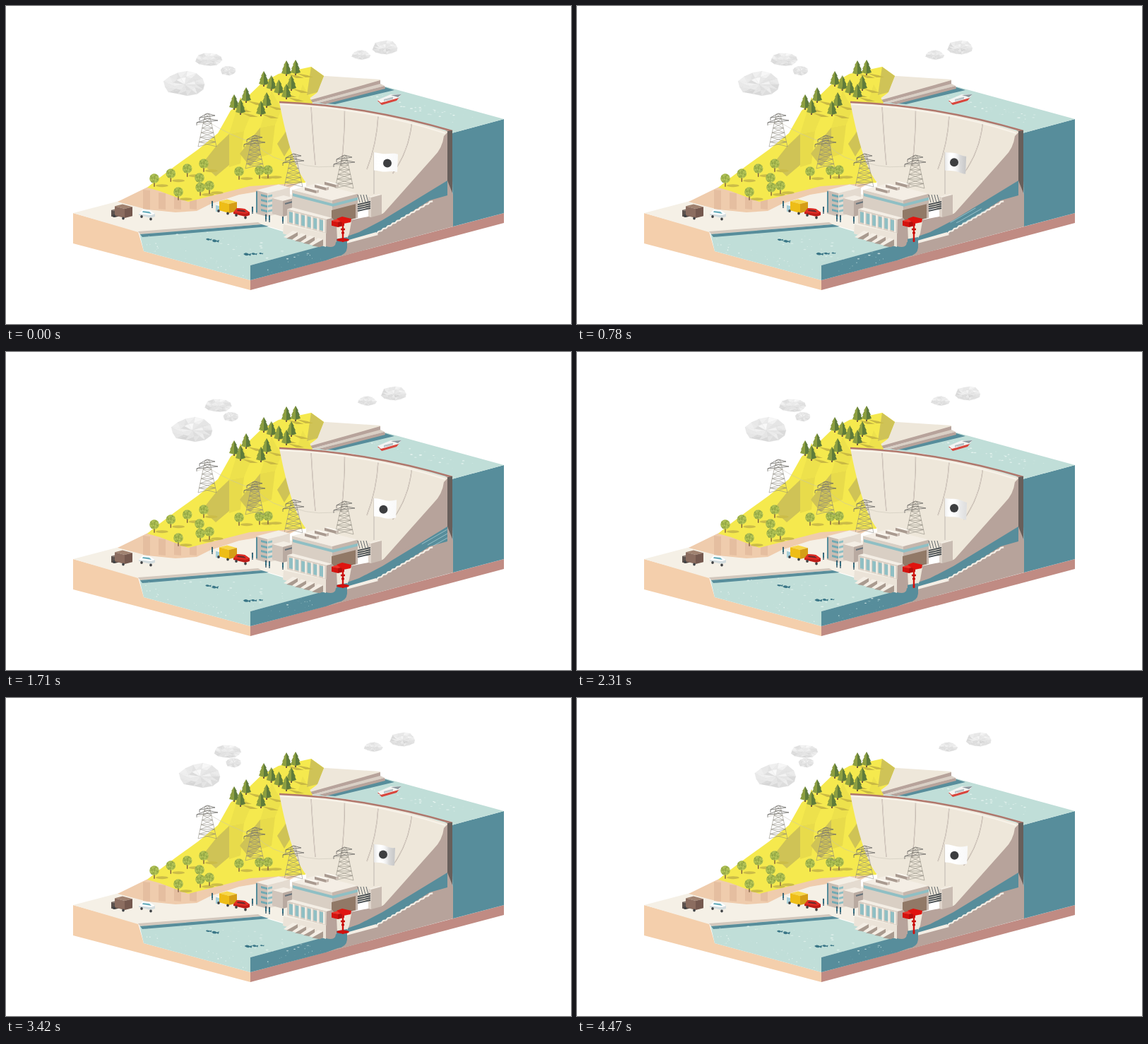
An HTML page for the animation above (4500 ms loop, 800 by 450 pixels).

```html
<!DOCTYPE html>
<html lang="en">
<head>
<meta charset="utf-8">
<title>Hydroelectric dam</title>
<style>
html, body { margin: 0; width: 100%; height: 100%; overflow: hidden; background: #fff; }
svg { display: block; width: 100vw; height: 100vh; }
</style>
</head>
<body>
<svg id="stage" viewBox="0 0 800 450">
  <defs>
    <linearGradient id="fold">
      <stop offset="0" stop-color="#777" stop-opacity=".3"/>
      <stop offset=".3" stop-color="#fff" stop-opacity="0"/>
      <stop offset=".7" stop-color="#777" stop-opacity=".4"/>
      <stop offset="1" stop-color="#888" stop-opacity=".7"/>
    </linearGradient>
  </defs>
</svg>
<script>
const NS = 'http://www.w3.org/2000/svg';
const LOOP = 4500, STEP = 30, TAU = Math.PI * 2;
const ISO = .26; // slope of the two ground axes
const stage = document.getElementById('stage');
const cream = '#eee7da', light = '#f4eee5', mauve = '#b7a39b', teal = '#578d9b', pale = '#c0ded8', glass = '#8fbfc4';

let seed = 11;
const rnd = () => (seed = (seed * 16807) % 2147483647) / 2147483647;
const times = (n, fn) => Array.from({ length: n }, (_, i) => fn(i));

function add(tag, attrs, parent = stage) {
  const el = document.createElementNS(NS, tag);
  for (const k in attrs) el.setAttribute(k, attrs[k]);
  parent.appendChild(el);
  return el;
}
const poly = (fill, points, parent) => add('polygon', { fill, points }, parent);
const path = (fill, d, parent) => add('path', { fill, d }, parent);
const line = (stroke, w, d, parent) =>
  add('path', { stroke, d, fill: 'none', 'stroke-width': w, 'stroke-linejoin': 'round' }, parent);
const oval = (fill, cx, cy, rx, ry, parent) => add('ellipse', { fill, cx, cy, rx, ry }, parent);

// upright parallelogram whose top edge starts at x, y
const panel = (fill, x, y, w, h, slope = ISO) =>
  path(fill, `M${x} ${y}l${w} ${w * slope}v${h}l${-w} ${-w * slope}z`);

// block seen from above; x, y is its front top corner
function box(x, y, l, r, h, [top, left, right]) {
  path(top, `M${x} ${y}l${-l} ${-l * ISO}l${r} ${-r * ISO}l${l} ${l * ISO}z`);
  panel(left, x - l, y - l * ISO, l, h);
  panel(right, x, y, r, h, -ISO);
}

function drawGround() {
  poly('#f4cfac', '95,293 187,319 195,347 346,388 346,402 95,336');
  poly('#c08b83', '346,388 705,293 705,307 346,402');
  poly('#f5f0e6', '95,293 160,276 352,250 460,285 460,338 362,309 187,320');
  poly(pale, '189,322 362,310 455,338 346,367 346,388 195,347');
  poly('#d3c8bd', '187,319 357,306 362,309 190,323');
  poly(teal, '190,323 362,309 372,312 193,327');
  poly(teal, '346,367 453,338 453,360 346,388');
}

function drawReservoir() {
  poly(teal, '631,180 705,160 705,293 633,312');
  poly(pale, '430,137 537,114 705,160 631,180 560,160 490,144');
  poly(teal, '442,137 537,115 550,119 466,139');
  poly(cream, '437,98 530,104 530,109 424,136');
  poly(mauve, '530,105 530,111 432,137 420,136');
  poly('#d9cfc5', '530,110 536,113 445,137 432,137');
  poly(mauve, '536,113 537,117 452,139 444,137');
  // ship
  poly('#d8453c', '526,134 557,129 553,134 532,140');
  poly('#f4f4f2', '526,133 545,125 560,125 556,130 531,137');
  poly('#8b969d', '545,126 560,125 555,129');
  panel('#b9c2c6', 535, 132, 13, 3, -ISO);
}

function drawHill() {
  poly('#efccad', '158,277 203,255 258,274 345,252 420,248 400,258 354,263 330,267 290,280 270,290 240,292 200,288');
  times(4, i => panel('#e5bea0', 194 + i * 22, 260 + i * 4, 10, 27 - i * 4, .1));
  path('#f5e94e', 'M200 257L212 247L240 226L272 203L300 180L318 148L336 134L362 109L386 96L432 86L450 99L440 123L424 135V250L345 255L258 277L218 262Z');
  // three large creases, each with a shaded and a lit side
  times(3, i => {
    const x = 316 + i * 44, w = 38 - i * 9, top = 181 - i * 9, foot = 241 - i * 14;
    poly('#cfc356', `${x},${top} ${x},${foot - 16} ${x - w / 2},${foot} ${x - w},${foot - 18} ${x - w / 2},${top + 18}`);
    poly('#e8db4b', `${x},${top} ${x + 21},${top - 4} ${x + 16},${foot - 18} ${x},${foot - 13}`);
    poly('#ede14c', `${x},${top} ${x + 16},${top - 52} ${x + 30},${top - 26} ${x + 21},${top - 4}`);
  });
  poly('#cfc357', '432,86 450,99 441,122 426,126');
}

function pine(x, y) {
  const g = add('g', { transform: `translate(${x} ${y})` });
  poly('#c9b944', '1,18 17,21 25,24 14,24', g);
  line('#76573f', 2, 'M0 16v5', g);
  poly('#8c9e40', '0,-1 -4,6 -3,6 -6,12 -5,12 -7,17 0,19', g);
  poly('#5f7b3b', '0,-1 4,6 3,6 6,12 5,12 7,17 0,19', g);
}

function bush(x, y) {
  const r = 6.8;
  oval('#cbbc48', x + r * 1.6, y + r * 1.5, r * 1.3, 2);
  line('#7b5b3d', 1.4, `M${x} ${y + r - 1}v6`);
  oval('#a5b84d', x, y, r, r);
  times(16, i => {
    const a = i * 2.4, d = r * Math.sqrt(i / 17);
    oval(i % 2 ? '#c9d46c' : '#7f9340', x + Math.cos(a) * d, y + Math.sin(a) * d, .8, .7);
  });
}

// n plants from x, y; bend < 1 crowds them toward the far end
const row = (plant, n, x, y, dx, dy, bend = 1) =>
  times(n, i => {
    const u = (i / (n - 1)) ** bend;
    plant(x + dx * u, y + dy * u);
  });

function drawTrees() {
  row(pine, 2, 397, 78, 13, -1);
  row(pine, 2, 404, 99, -35, 24);
  row(pine, 4, 365, 93, 32, 18);
  row(pine, 2, 340, 116, -17, 10);
  row(pine, 2, 332, 133, 29, 2);
  row(bush, 4, 280, 223, -70, 21);
  row(bush, 3, 330, 234, 41, -2, .5);
  bush(274, 243);
  row(bush, 3, 244, 263, 44, -9, .5);
}

function drawDam() {
  path(mauve, 'M612 180L625 176V249L533 300V285Z');
  path(cream, 'M387 136Q510 141 626 178L620 184Q618 201 606 213L533 295L425 262V250Q404 225 387 136Z');
  times(4, i => {
    const x = 432 + i * 47.5, d = `M${x} ${141 + i * 5 + i * i}q${2 - i * 2} 40 ${6 - i * 11} ${84 - i * 4}`;
    line('#a99b91', 1.3, d);
    line('#faf5ec', .6, d);
  });
  line('#f8f3ea', 2, 'M388 139Q510 144 622 180');
  line('#b0766b', 2.6, 'M387 136Q510 141 632 177');
  panel('#685f5b', 625, 177, 7, 92, -.15);
}

function drawSection() {
  poly(mauve, '453,302 462,308 533,294 625,247 633,267 633,312 453,360');
  path(teal, 'M625 247V268L600 275L542 312L527 321L483 333V326L500 320L533 303Z');
  poly(light, '482,336 482,332 524,320 527,324');
  line(light, 2.2, 'M525 322' + 'l2.4 -3l4.2 -.8'.repeat(12));
  poly(cream, '468,308 489,305 486,322 482,331 469,332');
  path(teal, 'M466 330L483 327V342Q482 352 470 354L453 360V340Q470 344 466 330Z');
}

function drawPlant() {
  // office
  box(370, 265, 16, 32, 33, ['#f4efe6', '#cabdb3', '#e4dbd0']);
  times(4, i => {
    panel('#70a9b3', 361, 266 + i * 7, 9, 3);
    panel(glass, 371, 268 + i * 7, 6, 3, -ISO);
  });
  panel(teal, 354, 262, 2, 30);
  box(392, 276, 15, 16, 22, [light, '#d1c5bb', '#b9aaa1']);
  line('#66727a', 2, 'M395 280L406 277');

  // turbine hall
  box(462, 275, 57, 36, 34, [light, '#d9cfc4', '#c5b6ac']);
  panel(glass, 406, 265, 56, 4);
  panel(glass, 462, 280, 36, 4, -ISO);
  panel('#917967', 461, 289, 34, 20, -ISO);
  times(3, i => box(439 + i * 14, 261 - i * 4, 16, 4, 4, ['#fbf7f0', '#a99a90', '#c9bcb2']));

  // switchgear and side wall
  box(517, 271, 4, 15, 28, [light, '#ded4ca', '#c9bcb2']);
  times(4, i => {
    line('#474d50', 1.8, `M498 ${281 + i * 3}l18 -4`);
    line('#62696c', 1, `M${501 + i * 4} 278l-3 -11`);
  });

  // intake annex
  box(454, 302, 56, 8, 20, [light, '#d9cfc4', mauve]);
  times(6, i => {
    const x = 401 + i * 8.6, y = 291 + i * 2.2;
    panel(glass, x, y, 5, 15);
    panel(light, x + 5, y, 2.4, 18);
  });
  poly(mauve, '454,303 462,300 468,308 468,334 453,340');

  // spillways
  poly('#ebe3d8', '393,309 453,322 453,341 392,322');
  times(4, i => {
    const at = `M${393 + i * 12} ${327 + i * 3.4}`;
    path(light, at + 'l13 -9l8 2l-14 9z');
    path('#a99a8f', at + 'm4 2l16 -9v9l-5 2z');
  });
}

function drawPylon(x, y) {
  const h = 46, rungs = 7, half = k => 3 + 10 * k;
  const d = times(rungs, i => {
    const a = i / rungs, b = (i + 1) / rungs, p = half(a), q = half(b), s = h / rungs;
    return `M${x - p} ${y + a * h}h${2 * p}l${q - p} ${s}L${x - p} ${y + a * h}l${p - q} ${s}L${x + p} ${y + a * h}`;
  }).join('');
  line('#88857a', .55, d);
  line('#6c6b68', .8, [2, 9].map((dy, i) => {
    const w = 11 + i * 4;
    return `M${x - w} ${y + dy + 3}L${x} ${y + dy - 3}L${x + w} ${y + dy}zv4`;
  }).join(''));
}

function wheels(x, y, gap) {
  oval('#3f4144', x, y, 1.8, 2);
  oval('#3f4144', x + gap, y + gap * ISO, 1.8, 2);
}

function car(x, y, [roof, side, window]) {
  const at = `M${x} ${y}`;
  path(side, at + 'l5 -6l11 1l7 5v4l-6 2l-17 -4z');
  path(roof, at + 'l5 -6l11 1l7 5l-6 2z');
  path(window, at + 'm6 -4l9 1l3 3l-13 -2z');
  wheels(x + 4, y + 4, 13);
}

function truck(x, y, body, cab) {
  box(x - 14, y + 3, 5, 7, 9, cab);
  box(x, y, 14, 11, 13, body);
  wheels(x - 15, y + 10, 13);
}

function drawVehicles() {
  truck(168, 287, ['#a08270', '#8b6d60', '#75594f'], ['#83716a', '#5d534e', '#4d4541']);
  truck(316, 280, ['#f8d747', '#eebd17', '#d59d16'], ['#fff', '#a9d0d8', '#f2f4f3']);
  car(188, 294, ['#fff', '#d3dcde', '#69aebd']);
  car(322, 292, ['#e22d25', '#bd1c18', '#6b2a2c']);
  // people
  [[292, 281], [349, 289], [368, 300], [373, 301], [392, 303]].forEach(([x, y]) => {
    oval('#35596b', x, y - 4, 1.1, 1.2);
    line('#346f82', 2, `M${x} ${y - 3}v5`);
    line('#35596b', 1.4, `M${x} ${y + 1}v4`);
  });
}

drawGround();
drawReservoir();
drawHill();
drawTrees();
drawDam();
drawSection();

// wires from the plant to the hilltop
const wire = line('#c4c0b2', .5, 'M479 224Q442 233 407 221Q378 220 352 194Q318 184 285 163L271 168');
[[285, 153], [352, 184], [407, 210], [479, 212]].forEach(p => drawPylon(...p));
const wireLen = wire.getTotalLength();
const pulse = line('#72cfe6', 1.6, wire.getAttribute('d'));

drawPlant();
drawVehicles();

// turbine
box(470, 306, 9, 9, 7, ['#f2322a', '#d5120e', '#b50e0b']);
poly('#e0140f', '468,301 476,298 489,301 488,306 478,308');
line('#d5120e', 2.4, 'M477 306V334');
line('#c4100c', 2.6, 'M474 316h6M475 321h4');
const wheel = oval('#cf110e', 477, 331, 9, 2.6);

// flag
line('#d6cfc5', 2, 'M521 207V266');
const cloth = path('#fff', '');
const shade = path('url(#fold)', '');
const badge = oval('#3d3e40', 534, 222, 6, 6);

// fish
function school(x, y, n, gap, rise) {
  const g = add('g', {});
  times(n, i => {
    const s = 1.1 - i * .25;
    path('#397586', `M${x + gap * i} ${y + rise * i}q${3 * s} ${-3 * s} ${7 * s} 0l${3 * s} ${-s}l${-s} ${3.4 * s}l${-2.4 * s} ${-1.2 * s}q${-3 * s} ${2 * s} ${-6.6 * s} ${-1.2 * s}z`, g);
  });
  return g;
}
const leftFish = school(291, 332, 2, -8, -2);
const rightFish = school(337, 351, 3, 11, -.5);

// glints spread over a parallelogram: corner + u * a + v * b
const glints = [];
function scatter(n, corner, a, b, fill, wide, rise) {
  times(n, () => {
    const u = rnd(), v = rnd(), r = .3 + rnd() * .6;
    const x = corner[0] + u * a[0] + v * b[0], y = corner[1] + u * a[1] + v * b[1];
    glints.push({ el: oval(fill, x, y, r * wide, r), y, rise, ph: rnd(), rate: 2 + Math.floor(rnd() * 4) });
  });
}
scatter(50, [200, 326], [148, 38], [105, -8], '#e4f3ef', 2.4, 0);
scatter(44, [197, 330], [147, 40], [0, 15], '#f0faf7', 1, 4);
scatter(18, [352, 372], [95, -26], [0, 12], '#b8dad9', 1, 5);
scatter(46, [535, 122], [130, 36], [-30, 8], '#f0faf7', 2.6, 0);

// current in the penstock
const streams = times(3, i => {
  const el = line('#a9cdd3', .8, `M625 ${251 + i * 6}L${533 + i * 8} ${304 + i}L486 ${328 + i}`);
  return { el, len: el.getTotalLength(), lag: i * .04 };
});

// dash window [from, to] along a path, both 0..1
function reveal(el, len, from, to) {
  const a = Math.max(0, from), b = Math.min(1, to);
  el.setAttribute('visibility', b > a ? 'visible' : 'hidden');
  if (b > a) el.setAttribute('stroke-dasharray', `0 ${a * len} ${(b - a) * len} ${len * 2}`);
}

// faceted cloud: a jittered oval cut into an outer ring and a fan
function cloud(x, y, w, h, speed) {
  const g = add('g', {}), n = 13;
  const rim = times(n, i => {
    const a = TAU * i / n, r = .9 + rnd() * .18;
    return [Math.cos(a) * r, Math.sin(a) * r * (Math.sin(a) > 0 ? .85 : 1)];
  });
  const at = (p, k) => `${x + w / 2 * (1 + p[0] * k)},${y + h / 2 * (1 + p[1] * k)}`;
  const facet = (p, ...pts) => {
    const c = Math.round(230 - p[1] * 7 + (rnd() - .5) * 26);
    add('polygon', { fill: `rgb(${c},${c},${c})`, points: pts.join(' '), stroke: '#dcdcdc', 'stroke-width': .25 }, g);
  };
  rim.forEach((p, i) => {
    const q = rim[(i + 1) % n];
    facet(p, at(p, 1), at(q, 1), at(p, .55));
    facet(p, at(q, 1), at(q, .55), at(p, .55));
    facet(p, at(p, .55), at(q, .55), at(p, 0));
  });
  return { g, speed };
}
const clouds = [
  cloud(224, 93, 58, 36, 6.4), cloud(269, 67, 37, 19, 7.8), cloud(304, 85, 22, 14, 2.2),
  cloud(490, 63, 25, 14, 5.1), cloud(519, 49, 36, 21, 7.2)
];

function waveFlag(t) {
  const p = (t / 1380) % 1, len = 32 + 2 * Math.cos(TAU * p);
  const top = [], low = [];
  for (let u = 0; u <= 1; u += 1 / 8) {
    const x = 521 + u * len, dy = 4 * u + 2 * u * Math.sin(TAU * (u * .9 - p));
    top.push(`${x} ${207 + dy}`);
    low.unshift(`${x - u} ${232.5 + dy * .9}`);
  }
  const d = 'M' + top.concat(low).join('L') + 'Z';
  cloth.setAttribute('d', d);
  shade.setAttribute('d', d);
  shade.setAttribute('opacity', Math.max(.08, Math.cos(TAU * (p - .52)) * .7));
  badge.setAttribute('cx', 534 + 6 * Math.max(0, Math.cos(TAU * p)));
  badge.setAttribute('cy', 222 + Math.sin(TAU * (.4 - p)));
}

function render(t) {
  clouds.forEach(c => c.g.setAttribute('transform', `translate(${c.speed * t / 1000} 0)`));
  waveFlag(t);
  wheel.setAttribute('rx', 1.5 + 8.5 * Math.abs(Math.cos(Math.PI * (t / 90 - 1 / 6))));

  const k = TAU * t / LOOP;
  leftFish.setAttribute('transform', `translate(${Math.sin(k * 2) * .8} ${Math.sin(k) * .6})`);
  rightFish.setAttribute('transform', `translate(${Math.sin(k * 2 - .6) * 1.4} ${-Math.sin(k * 2) * .7})`);

  glints.forEach(s => {
    const q = (t / LOOP * s.rate + s.ph) % 1;
    s.el.setAttribute('opacity', Math.sin(Math.PI * q) ** 2 * .85);
    s.el.setAttribute('cy', s.y + s.rise * (.5 - q));
  });

  const flow = ((t % 1080) - 540) / 480;
  streams.forEach(s => reveal(s.el, s.len, (flow - s.lag) * 1.4 - .26, (flow - s.lag) * 1.4));

  const spark = (t - 2380) / 420;
  reveal(pulse, wireLen, spark - .03, spark + .03);
}

function tick(now) {
  render(Math.floor((now % LOOP) / STEP) * STEP);
  requestAnimationFrame(tick);
}
render(0);
requestAnimationFrame(tick);
</script>
</body>
</html>
```
